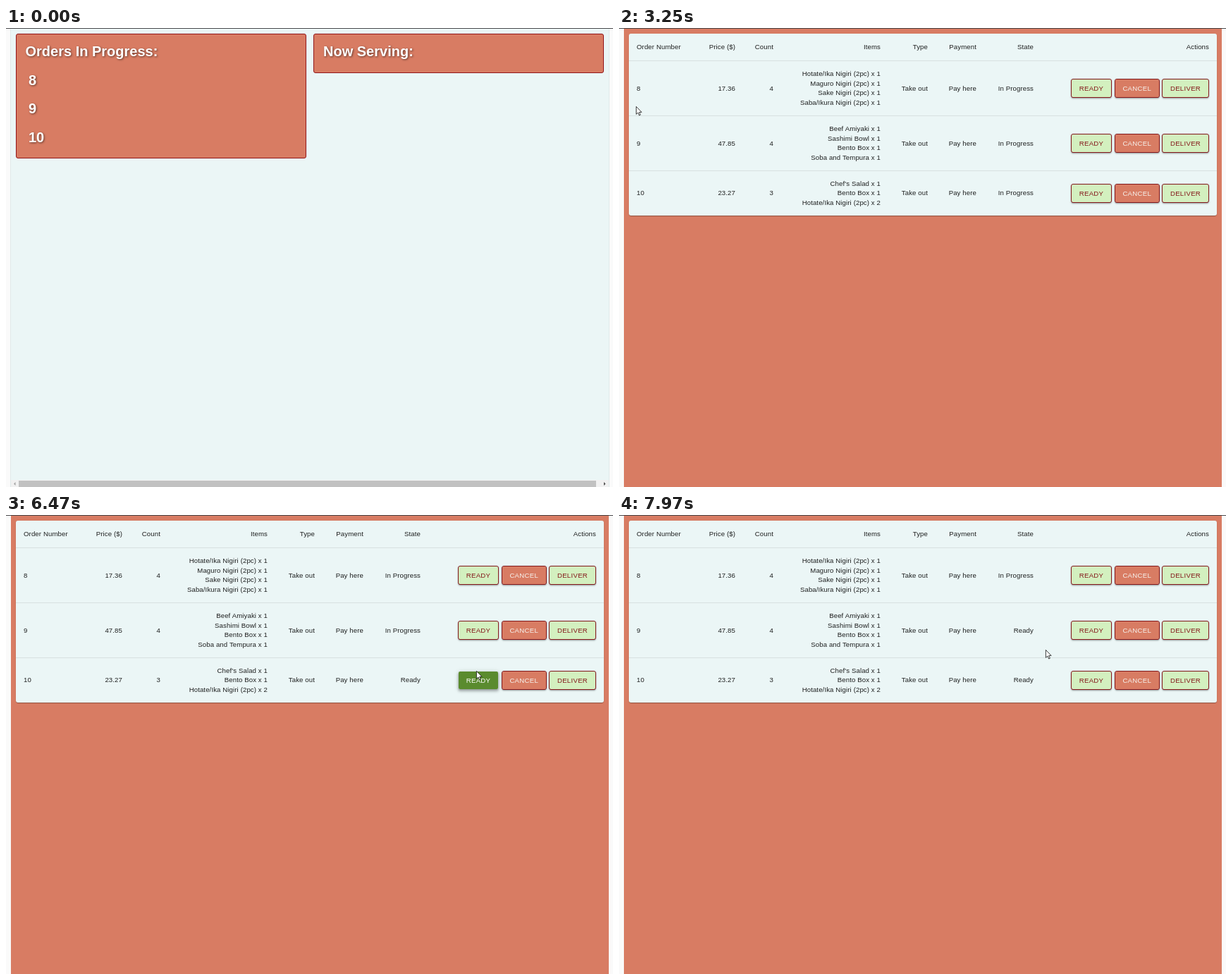
Animation of 861x651 px, one loop 8000 ms. Source, as an HTML page:

```html
<!DOCTYPE html>
<html lang="en">
<head>
<meta charset="utf-8">
<title>Order board</title>
<style>
html, body { margin: 0; width: 100%; height: 100%; overflow: hidden; background: #fafafa; }
#stage { position: absolute; left: 0; top: 0; width: 861px; height: 651px; overflow: hidden;
  font: 9.63px/13.77px "Liberation Sans", Arial, sans-serif; letter-spacing: .01071em; color: rgba(0,0,0,.87); }
#stage div, #stage svg { position: absolute; box-sizing: border-box; }
.text { white-space: pre; text-align: right; }
#rule { left: 0; top: 0; width: 861px; height: 1px; background: #48484a; }
#board { left: 6px; top: 1px; width: 850px; height: 650px; background: #ebf6f6; border: solid #e0eaea; border-width: 0 1px; }
.panel { background: #d87c63; border: 1px solid #92161a; border-radius: 3px; }
.big { font-weight: bold; font-size: 20px; line-height: 24px; letter-spacing: 0; color: #fff;
  white-space: pre; text-shadow: 1px 1px 3px rgba(0,0,0,.55); }
#track { left: 7px; top: 641px; width: 848px; height: 10px; background: #f1f1f1; }
#thumb { left: 18px; top: 642px; width: 819px; height: 9px; }
#page { top: 1px; height: 650px; background: #d87c63; }
#card { left: 14px; top: 8px; width: 834px; height: 258px; background: #ebf6f6; border-radius: 3px;
  box-shadow: 0 1.4px .7px -.7px rgba(0,0,0,.2), 0 .7px .7px rgba(0,0,0,.14), 0 .7px 2px rgba(0,0,0,.12); }
.line { left: 14px; width: 834px; height: 1px; background: #d7e1e1; }
.button { height: 27px; line-height: 25px; text-align: center; letter-spacing: .02857em; border: 1px solid #84181b;
  border-radius: 3px; background: #d3f0bf padding-box; color: #84181b;
  box-shadow: 0 2px .7px -1.4px rgba(0,0,0,.2), 0 1.4px 1.4px rgba(0,0,0,.14), 0 .7px 3.4px rgba(0,0,0,.12); }
.cancel { background-color: #d87c63; color: #f6f3ee; }
</style>
</head>
<body>
<div id="stage">
  <div id="boardView">
    <div id="board"></div>
    <div id="track"></div>
    <div id="thumb"></div>
    <svg width="861" height="651"><path d="M13.5 644v5l-2.5-2.5z" fill="#a3a3a3"/><path d="M848 644v5l2.5-2.5z" fill="#505050"/></svg>
  </div>
  <div id="page"></div>
  <div id="tableView"><div id="card"></div></div>
  <svg id="spinner" width="27.5" height="27.5" viewBox="22 22 44 44" style="top:7.5px">
    <circle id="arc" cx="44" cy="44" r="20.2" fill="none" stroke="#fff" stroke-width="3.6"/>
  </svg>
  <svg id="cursor" width="12" height="16" overflow="visible">
    <path d="M.4.4V11.3L2.9 9 4.7 13 6.4 12.2 4.7 8.4H8.1Z" fill="#fff" stroke="#111" stroke-width=".8"/>
  </svg>
  <div id="rule"></div>
</div>
<script>
const $ = id => document.getElementById(id);

function add(parent, className, style, text = '') {
  const el = document.createElement('div');
  el.className = className;
  for (const key in style) el.style[key] = style[key] + 'px';
  el.textContent = text;
  parent.append(el);
  return el;
}

// Order board
const board = $('boardView'), table = $('tableView');
add(board, 'panel', { left: 14, top: 8, width: 411.5, height: 177 });
add(board, 'panel', { left: 436, top: 8, width: 412, height: 55.5 });
[[27.5, 33, 'Orders In Progress:'], [450, 33, 'Now Serving:'], [32, 73.5, '8'], [32, 114, '9'], [32, 154.5, '10']]
  .forEach(([left, y, text]) => add(board, 'big', { left, top: y - 12 }, text));

// Order table
const edges = [165, 219, 371, 438, 507, 588, 837];
const cell = (edge, y, text) =>
  add(table, 'text', { right: 861 - edge, top: y - 6.9 * text.split('\n').length }, text);
const leftCell = (y, text) => add(table, 'text', { left: 25, top: y - 6.9 }, text);
table.style.width = '861px';

leftCell(27.2, 'Order Number');
['Price ($)', 'Count', 'Items', 'Type', 'Payment', 'State', 'Actions'].forEach((text, i) => cell(edges[i], 27.2, text));
[46, 124, 202].forEach(top => add(table, 'line', { top }));

const rows = [
  [85.5, '8', '17.36', '4', 'Hotate/Ika Nigiri (2pc) x 1\nMaguro Nigiri (2pc) x 1\nSake Nigiri (2pc) x 1\nSaba/Ikura Nigiri (2pc) x 1'],
  [163.4, '9', '47.85', '4', 'Beef Amiyaki x 1\nSashimi Bowl x 1\nBento Box x 1\nSoba and Tempura x 1'],
  [234.3, '10', '23.27', '3', "Chef's Salad x 1\nBento Box x 1\nHotate/Ika Nigiri (2pc) x 2"]
].map(([y, number, ...cells]) => {
  leftCell(y, number);
  const made = [...cells, 'Take out', 'Pay here', 'In Progress'].map((text, i) => cell(edges[i], y, text));
  const button = (left, width, text, kind = '') =>
    add(table, 'button ' + kind, { left, top: Math.round(y - 13.6), width }, text);
  const ready = button(641, 58, 'READY');
  button(702.5, 64.5, 'CANCEL', 'cancel');
  button(770, 67, 'DELIVER');
  return { state: made[5], ready };
});

// Motion
const clamp = v => Math.min(1, Math.max(0, v));
const ramp = (t, from, length = 250) => clamp((t - from) / length);
const ease = v => v * v * (3 - 2 * v);
const mix = (a, b, k) => a.map((v, i) => Math.round(v + (b[i] - v) * k));
const within = (t, from, to) => t >= from && t < to;

const path = [
  [80, 420, 287], [140, 408, 420], [200, 392, 590], [260, 385, 655],
  [3250, 23, 110], [3400, 140, 185], [3560, 290, 275], [3700, 400, 332], [3800, 478, 352], [3870, 515, 345],
  [3950, 547, 326], [4040, 566, 306], [4070, 567, 304], [4220, 577, 290.5], [4400, 577, 290.5],
  [4600, 597, 269], [4810, 624, 244], [4890, 641, 232], [4950, 647, 228], [6430, 647, 228],
  [6520, 690, 212], [6680, 815, 202], [6740, 826, 199], [6800, 805, 195], [6900, 712, 184], [6980, 680, 175],
  [7120, 660.5, 169.5], [7620, 660.5, 169.5], [7740, 640, 177], [7970, 604.5, 191]
];

function position(t) {
  const i = path.findIndex(p => p[0] > t);
  if (i < 0) return path.at(-1).slice(1);
  const a = path[i - 1], b = path[i], k = (t - a[0]) / (b[0] - a[0]);
  return [a[1] + (b[1] - a[1]) * k, a[2] + (b[2] - a[2]) * k];
}

function paintReady(el, hover, press, x, y) {
  const rgb = (a, b) => `rgb(${mix(a, b, hover)})`;
  el.style.backgroundColor = rgb([211, 240, 191], [90, 139, 46]);
  el.style.color = rgb([132, 24, 27], [255, 255, 255]);
  el.style.borderColor = `rgba(132,24,27,${1 - hover})`;
  el.style.boxShadow = hover ? `0 ${2 - .6 * hover}px ${.7 + 2 * hover}px -1px rgba(0,0,0,.2),
    0 ${1.4 + 1.4 * hover}px ${1.4 + 2 * hover}px rgba(0,0,0,.14), 0 .7px ${3.4 + 3.4 * hover}px rgba(0,0,0,.12)` : '';
  el.style.backgroundImage = press > 0
    ? `radial-gradient(circle ${(60 * ease(press)).toFixed(2)}px at ${x}px ${y}px, rgba(255,255,255,.25) 95%, transparent)` : '';
}

function paintSpinner(t) {
  const p = t / 1400 % 1;
  const first = ease(clamp(p * 2)), second = ease(clamp(p * 2 - 1));
  const arc = $('arc');
  arc.setAttribute('stroke-dasharray', `${1 + 99 * first} 200`);
  arc.setAttribute('stroke-dashoffset', -15 * first - 110 * second);
  arc.setAttribute('transform', `rotate(${360 * p} 44 44)`);
}

const show = (el, on) => el.style.display = on ? '' : 'none';
const loads = [[2445, 2550], [5450, 5870], [7440, 7850]];

function draw(t) {
  const onBoard = t < 2450;
  const load = loads.find(([from, to]) => !onBoard && within(t, from, to));
  const narrow = t < 2550;
  show(board, onBoard);
  show($('page'), !onBoard);
  show(table, !onBoard && !load);
  show($('spinner'), load);
  $('page').style.left = (narrow ? 241 : 7) + 'px';
  $('page').style.width = (narrow ? 380 : 848) + 'px';
  $('thumb').style.background = within(t, 200, 260) ? '#a8a8a8' : '#c1c1c1';
  $('spinner').style.left = (narrow ? 247.8 : 13.5) + 'px';
  if (load) paintSpinner(t - load[0]);

  const hover10 = t < 5450 ? ramp(t, 4890) : ramp(t, 5870) - ramp(t, 6480);
  const hover9 = t < 7440 ? ramp(t, 6970) : 0;
  paintReady(rows[1].ready, hover9, t < 7440 ? ramp(t, 7150, 550) : 0, 19, 19);
  paintReady(rows[2].ready, hover10, t < 5450 ? ramp(t, 5210, 550) : 0, 5, 6);
  rows[1].state.textContent = t < 7850 ? 'In Progress' : 'Ready';
  rows[2].state.textContent = t < 5870 ? 'In Progress' : 'Ready';

  const visible = within(t, 80, 260) || t >= 3250;
  show($('cursor'), visible);
  if (visible) {
    const [x, y] = position(t);
    $('cursor').style.transform = `translate(${Math.round(x)}px, ${Math.round(y)}px)`;
  }
}

const start = performance.now();
function tick() {
  draw((performance.now() - start) % 8000);
  requestAnimationFrame(tick);
}
tick();
</script>
</body>
</html>
```
